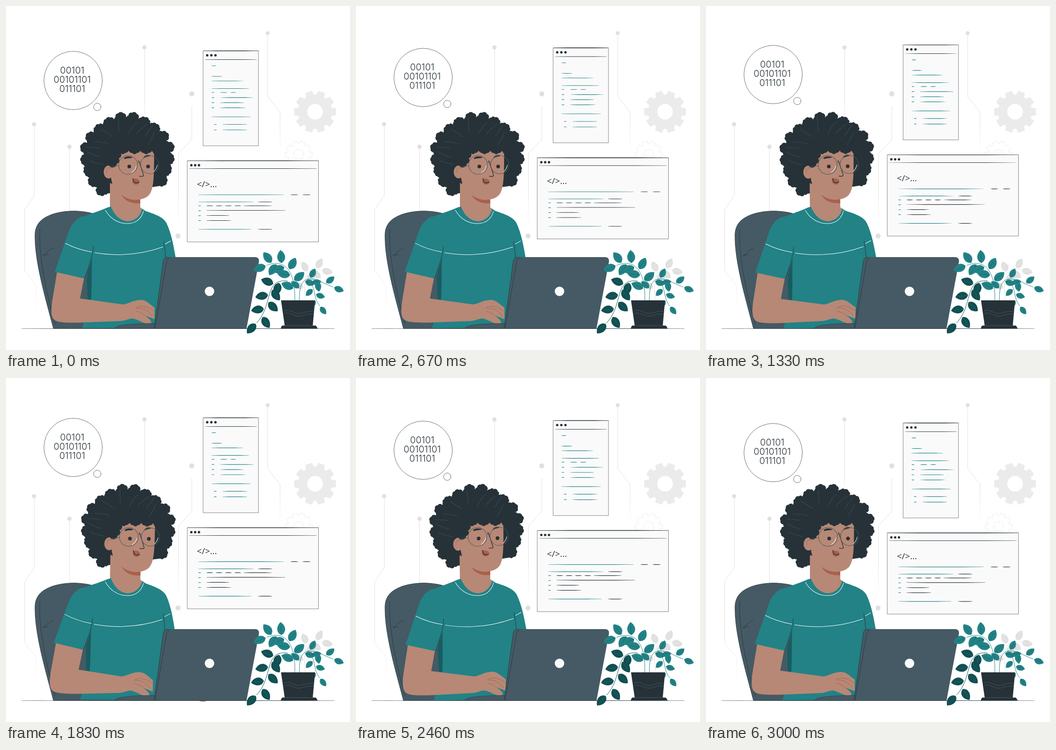
An HTML page for the animation above (3040 ms loop, 748 by 748 pixels).

```html
<!DOCTYPE html>
<html lang="en">
<head>
<meta charset="utf-8">
<title>Coder at a desk</title>
<style>
  html, body { margin: 0; height: 100%; overflow: hidden; background: #fff; }
  svg { display: block; width: 100vw; height: 100vh; }
</style>
</head>
<body>
<svg id="stage" viewBox="0 0 748 748" stroke-linecap="round" stroke-linejoin="round"></svg>
<script>
const DARK = '#263238', SLATE = '#455a64', TEAL = '#228286', DEEP = '#124f52',
      SKIN = '#b78876', RUST = '#a9604c', GREY = '#e0e0e0', PALE = '#ebebeb';
const LOOP = 3040, RAD = Math.PI / 180;

const range = n => [...Array(n).keys()];
const fill = (d, color) => `<path d="${d}" fill="${color}"/>`;
const line = (d, color, w = 1) => `<path d="${d}" fill="none" stroke="${color}" stroke-width="${w}"/>`;
const dot = (x, y, r, color) => `<circle cx="${x}" cy="${y}" r="${r}" fill="${color}"/>`;
const ring = (x, y, r, color, w = 1, inside = 'none') =>
  `<circle cx="${x}" cy="${y}" r="${r}" fill="${inside}" stroke="${color}" stroke-width="${w}"/>`;
const polar = (cx, cy, deg, rx, ry = rx) => [cx + rx * Math.cos(deg * RAD), cy + ry * Math.sin(deg * RAD)];

// Horizontal pen stroke, thick in the middle and thin at both ends
const pen = (x, y, width, color, h = .6) => {
  const t = width / 4;
  return fill(`M${x} ${y - .2}l${t} ${.2 - h}h${2 * t}l${t} ${h - .2}v.4l${-t} ${h - .2}h${-2 * t}l${-t} ${.2 - h}z`, color);
};

// Outline of round bumps through the points
const bumps = pts => pts.map(([x, y], i) => {
  if (!i) return `M${x} ${y}`;
  const r = .6 * Math.hypot(x - pts[i - 1][0], y - pts[i - 1][1]);
  return `A${r} ${r} 0 0 1 ${x} ${y}`;
}).join('');

// Thin line that fades out downwards
let fades = 0;
const circuit = (d, top, bottom) => {
  const id = 'fade' + fades++;
  return `<linearGradient id="${id}" gradientUnits="userSpaceOnUse" x1="0" x2="0" y1="${top}" y2="${bottom}">
    <stop stop-color="${GREY}"/><stop offset=".7" stop-color="${GREY}"/>
    <stop offset="1" stop-color="${GREY}" stop-opacity="0"/></linearGradient>` + line(d, `url(#${id})`);
};

const gear = (cx, cy, root, tip, hole) => {
  const teeth = range(10).flatMap(i =>
    [[-14, root], [-9.5, tip], [9.5, tip], [14, root]].map(([a, r]) => polar(cx, cy, 36 * i + a, r)));
  return `M${teeth.join('L')}zM${cx + hole} ${cy}a${hole} ${hole} 0 1 0 ${-2 * hole} 0a${hole} ${hole} 0 1 0 ${2 * hole} 0z`;
};

const leaf = (x, y, angle, n, color, vein) => {
  const w = n * .37;
  return `<g transform="translate(${x} ${y})rotate(${angle})">` +
    fill(`M0 0C${n * .15} ${-w} ${n * .65} ${-w * 1.1} ${n} 0C${n * .7} ${w * 1.1} ${n * .2} ${w * 1.2} 0 0z`, color) +
    line(`M0 0Q${n * .4} -1 ${n * .75} 0`, vein, .5) + '</g>';
};

// Curved stem with leaves on alternate sides and one at the end
const branch = (a, b, c, d, count, size, color, vein) => {
  const at = (t, i) => (1 - t) ** 3 * a[i] + 3 * t * (1 - t) ** 2 * b[i] + 3 * t * t * (1 - t) * c[i] + t ** 3 * d[i];
  return line(`M${a}C${b} ${c} ${d}`, color) + range(count).map(i => {
    const t = .14 + .86 * i / (count - 1), x = at(t, 0), y = at(t, 1);
    const heading = Math.atan2(y - at(t - .02, 1), x - at(t - .02, 0)) / RAD;
    const side = i == count - 1 ? 0 : i % 2 ? 62 : -62;
    const gap = polar(x, y, heading + side, 3);
    return leaf(...gap, heading + side, size, color, vein);
  }).join('');
};

const frame = (x, y, w, h, bar, step) =>
  `<rect x="${x}" y="${y}" width="${w}" height="${h}" fill="#fafafa" stroke="${DARK}" stroke-width=".6"/>` +
  pen(x, y, w, DARK, .7) + pen(x + 4, y + bar, w - 8, DARK, .5) +
  range(3).map(i => dot(x + 8 + 4.5 + i * step - 4, y + 9.7, 2.6, DARK)).join('');

const backdrop =
  circuit('M301.5 94V245', 94, 260) + dot(301, 90, 4.5, GREY) +
  circuit('M569 63V197L596 231V320', 63, 325) + dot(569, 59, 4.3, GREY) +
  circuit('M404 218V290L375 321V480', 205, 485) + dot(404, 191, 5.5, GREY) + dot(374, 500, 5.5, GREY) +
  circuit('M61.5 261V412L40.5 443V576L66 607V672', 261, 675) + dot(61, 257, 4.6, GREY) +
  circuit('M138 310V446', 310, 520) + dot(138, 306, 4.6, GREY) +
  `<path d="${gear(672, 230, 37, 46, 17)}" fill="${PALE}" fill-rule="evenodd"/>` +
  line(gear(636.5, 323, 23.5, 29.5, 11), '#e6e6e6', .8);

const bubble =
  ring(146, 162, 63.5, DARK, .7, '#fff') + ring(198.5, 219.5, 8, DARK, .7, '#fff') +
  `<g font-family="Inter, sans-serif" font-size="20" font-weight="300" text-anchor="middle" fill="${DARK}">` +
  ['00101', '00101101', '011101'].map((s, i) => `<text x="144" y="${147 + 20 * i}">${s}</text>`).join('') + '</g>';

// Rows of code: short marks at the left, then strokes of varying length
const tallRows = [[130, 10], [153, 23], [163, 68], [179.5, 81], [241, 85]];
const tallWindow = frame(429, 97.5, 120, 206.5, 19, 9) +
  tallRows.map(([y, w]) => pen(447, y, w, TEAL)).join('') +
  [15, 72, 51, 54].map((w, i) => pen(447, 188 + 11.1 * i, 6, TEAL) + pen(466, 188 + 11.1 * i, w, TEAL)).join('') +
  pen(488, 188, 12, TEAL) +
  [257.5, 269.5].map(y => pen(452, y, 6, TEAL) + pen(471, y, 53, TEAL)).join('');

const wideRows = [[410.5, 185], [426, 119], [485.5, 115]];
const wideWindow = frame(394.5, 336.5, 285, 176.5, 17, 8.3) +
  `<text x="415" y="394" font-family="'Open Sans', sans-serif" font-size="19" fill="${DARK}">&lt;/&gt;...</text>` +
  wideRows.map(([y, w], i) => pen(418.5, y, w, TEAL) + pen(i ? 548 : 619, y, i ? 31 : 16, DARK)).join('') +
  pen(645, 410.5, 17, DARK) +
  range(4).map(i => pen(436 + 20.3 * i, 434.5, 14, DARK)).join('') + pen(517, 434.5, 60, DARK) +
  [171, 49, 53].map((w, i) => pen(436, 444.5 + 11 * i, w, DARK)).join('') +
  range(4).map(i => pen(418, 434.5 + 10.7 * i, 6, TEAL)).join('');

const chair =
  `<path d="M103 701C87 640 63 560 63 502C62 475 76 462 100 453C130 443 165 444 192 452L260 480V701z"
    fill="${SLATE}" stroke="${DARK}" stroke-width=".8"/>` +
  line('M74 485C70 520 80 600 107 692', DARK, .8) + line('M82 545Q90 531 103 527M80 542Q86 539 92 541', DARK, .8);

// Hair: a ring of curly locks, with deeper gaps at the crown
const LOCKS = 17, STEP = 285 / LOCKS;
const hairAt = (deg, k) => polar(264, 330, deg, 103 * k, 98 * k);
const hair = bumps(range(LOCKS).flatMap(i => {
  const a = 118 + i * STEP, crown = Math.max(0, -Math.sin(a * RAD));
  const reach = 1 - .05 * Math.sin(i * 2.4) ** 2;
  return [[0, .9 - .1 * crown], [.15, .94], [.4, reach + .01], [.75, reach], [.95, .93 - .03 * crown]]
    .map(([s, k]) => hairAt(a + s * STEP, k));
})) + 'z';
const curls = range(10).map(i => line(bumps(range(5).map(j =>
  hairAt(165 + 18 * i + 3 * j * Math.cos(i), .52 + .05 * (i % 3) + .07 * j))), SLATE, .7)).join('');
const fringe = fill(bumps([...range(10).map(i => [326 - 8.5 * i, i % 3 == 1 ? 307 : 320]),
  [245, 331], [241, 343], [227, 350]]) + 'L214 332L230 292L310 284z', DARK);

const head = fill(hair, DARK) +
  fill('M226 385V438C238 466 254 473 267 473C284 471 298 456 298 442L292 438V405z', SKIN) +
  fill('M251 410C262 420 280 424 292 420V429C272 430 258 424 251 410z', RUST) +
  fill('M228 345C225 385 235 400 250 409C270 424 298 425 311 411C321 399 322 375 322 322L300 288L245 298z', SKIN) +
  ring(219, 380, 5.5, DARK, 1.2) +
  `<ellipse cx="223" cy="361" rx="10.5" ry="14" fill="${SKIN}"/>` +
  line('M228 353C221 350 217 355 219 363', RUST, .9) +
  fringe + curls +
  fill('M256 331C260 326 269 326 275 329C273 332 263 330 258 333z', DARK) +
  fill('M299 329C303 324 309 323 314 325C312 328 304 327 300 331z', DARK) +
  dot(268, 349, 4, DARK) + dot(309, 349, 4, DARK) +
  line('M288 336C291 342 296 358 299 368Q299 372 290 370', DARK, 1.4) +
  fill('M275 376C281 374 289 376 290 380C292 386 284 391 278 387C274 385 275 380 275 376z', RUST) +
  line('M276 375C277 383 281 387 289 383', DARK, 1.6) +
  ring(265.5, 345.5, 20.5, SLATE) + ring(312.5, 345, 19.8, SLATE) +
  line('M286 341Q290 336 293.5 341M245 347L226 350', SLATE) +
  line('M283 348Q281 358 273 362M329 346Q327 355 321 360', '#fff');

const torso =
  fill('M221 438L228 436C238 460 252 468 267 468C283 466 293 455 296 441L304 446C325 453 342 459 349 472C360 495 365 525 369 548L372 640L358 690L320 699.5L165 700.5C170 690 174 670 178 636C176 620 174 600 178 590L187 524L150 470C165 455 190 452 221 438z', TEAL) +
  fill('M190 523C188 560 176 575 176 597C176 615 177 628 178 638L185 639C188 600 184 560 190 523z', '#185c60') +
  line('M343 512Q346 528 347 547', DARK, .9) +
  line('M216 444C228 465 248 474 265 473C284 473 295 461 299 446', '#fff') +
  line('M193 536.5Q270 549 341 524M346 517.5L358 511', '#fff');

const arm =
  fill('M112 572L100 645C98 665 97 680 110 685C120 689 145 689 170 688L250 685C262 684 270 678 278 680C290 683 303 693 312 691C321 689 313 681 302 673L323 681V656C312 648 305 639 293 639C275 640 268 647 255 649L161 636L171 585z', SKIN) +
  line('M283 657C296 656 309 661 318 674M284 655C298 650 309 654 321 663M283 664Q293 665 302 673', RUST, .9) +
  fill('M166 457C148 465 141 478 136 492L106 578L170 592.5C179 570 185 547 190 523L205 480z', TEAL) +
  line('M129 516Q156 530 187 535', '#fff') + line('M190 523C187 546 182 565 171 592', DARK, .8);

const farHand = `<ellipse cx="432" cy="697.5" rx="9" ry="3.5" fill="${SKIN}"/>`;

const laptop =
  `<path d="M236 701C240 694 262 691 323 690V701z" fill="${SLATE}" stroke="${DARK}" stroke-width=".6"/>` +
  fill('M322 701L342 554Q344 546 352 546H541Q551 546 550 556L523 701z', SLATE) +
  line('M357 547C350 549 349 557 348 563L324 701M322 701L342 554Q344 546 352 546', DARK, .8) +
  dot(442.5, 620.5, 10.3, '#fafafa');

const plant =
  branch([652, 640], [640, 570], [665, 570], [684, 574], 6, 24, GREY, '#f0f0f0') +
  branch([612, 598], [560, 592], [582, 650], [545, 689], 8, 28, DEEP, TEAL) +
  branch([628, 640], [630, 575], [605, 548], [567, 564], 9, 28, TEAL, DEEP) +
  branch([638, 640], [636, 565], [680, 600], [711, 611], 6, 22, TEAL, DEEP) +
  branch([656, 594], [676, 612], [666, 632], [682, 652], 5, 20, TEAL, DEEP) +
  fill('M598 640H672L667 695H606z', DARK) + fill('M597 701.5L600 695H674L678 701.5z', DARK) +
  [0, 6].map(y => line(`M605 ${663 + y}c13 -6 23 9 37 5s18 -5 27 -4`, SLATE, .9)).join('') + line('M603 695H670', SLATE, .9);

const stage = document.getElementById('stage');
stage.innerHTML = backdrop + chair + `<g id="person">${farHand + head + torso + arm}</g>` +
  `<g id="floating">${bubble + tallWindow + wideWindow}</g>` +
  pen(34, 701.5, 680, DARK, .45) + laptop + plant;
const person = document.getElementById('person'), floating = document.getElementById('floating');

// Triangle wave: 0, 1, 0, -1 over one period
const tri = p => 1 - 4 * Math.abs((p + .25) % 1 - .5);

const draw = now => {
  const t = now % LOOP + 35;
  const rise = 7.37 * (tri(t / LOOP + .25) - .954);
  const sway = 1.15 * (tri(2 * t / LOOP) - .09);
  floating.setAttribute('transform', `translate(0 ${rise})`);
  person.setAttribute('transform', `rotate(${sway} 260 443)`);
  requestAnimationFrame(() => draw(performance.now()));
};
draw(0);
</script>
</body>
</html>
```
